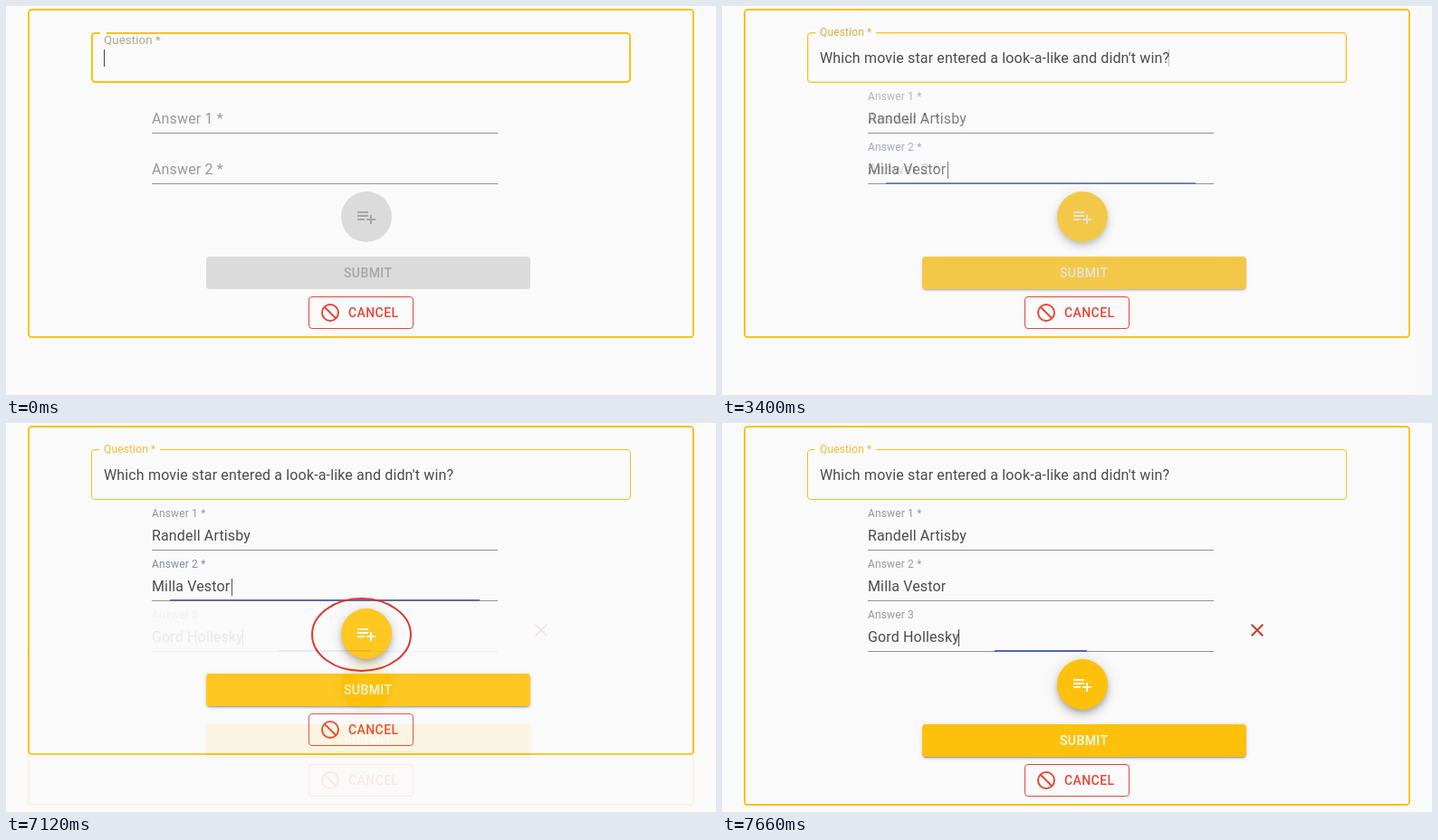
An HTML page that plays this animation: 784x430 px, repeating every 8000 ms.

```html
<!DOCTYPE html>
<html lang="en">
<head>
<meta charset="utf-8">
<title>Question form</title>
<style>
html, body { margin: 0; width: 100%; height: 100%; overflow: hidden; background: #fafafa; }
.scene { position: absolute; left: 0; top: 0; width: 784px; height: 430px; overflow: hidden; background: #fafafa; will-change: opacity; }
.scene svg { position: absolute; left: 0; top: 0; font: 16px Roboto, Arial, sans-serif; letter-spacing: .00938em; }
.button { font-size: 14px; font-weight: 500; letter-spacing: .02857em; }
.fab, .submit { position: absolute; background: #dbdbdb; }
.fab { left: 370px; width: 56px; height: 56px; border-radius: 50%; }
.submit { left: 221px; width: 358px; height: 36px; border-radius: 4px; }
.on { background: #fec10b; }
.fab.on { box-shadow: 0 3px 5px -1px rgba(0,0,0,.2), 0 6px 10px rgba(0,0,0,.14), 0 1px 18px rgba(0,0,0,.12); }
.submit.on { box-shadow: 0 3px 1px -2px rgba(0,0,0,.2), 0 2px 2px rgba(0,0,0,.14), 0 1px 5px rgba(0,0,0,.12); }
</style>
</head>
<body>
<script>
const LOOP = 8000, STEP = 60, STEPS = 10;
const INK = '#4c4c4c', GREY = '#999', YELLOW = '#f5c31c', RED = '#e5483a';
const ADD = 'M14 10H2v2h12v-2zm0-4H2v2h12V6zm4 8v-4h-2v4h-4v2h4v4h2v-4h4v-2h-4zM2 16h8v-2H2v2z';
const CLOSE = 'M19 6.41 17.59 5 12 10.59 6.41 5 5 6.41 10.59 12 5 17.59 6.41 19 12 13.41 17.59 19 19 17.59 13.41 12z';

const text = (s, x, y, color, size = 16) =>
  `<text x="${x}" y="${y}" fill="${color}" style="font-size:${size}px">${s}</text>`;
const buttonText = (s, x, y, color) =>
  `<text class="button" x="${x}" y="${y}" fill="${color}">${s}</text>`;
const bar = (x, y, w, h, color) =>
  `<rect x="${x}" y="${y}" width="${w}" height="${h}" fill="${color}"/>`;
const outline = (x, y, w, h, color, width) =>
  `<rect x="${x}" y="${y}" width="${w}" height="${h}" rx="3.5" fill="none" stroke="${color}" stroke-width="${width}"/>`;
const icon = (d, x, y, color) =>
  `<path d="${d}" transform="translate(${x} ${y})" fill="${color}"/>`;

function question({ value = '', focused, notch, label, caret }) {
  const box = focused ? outline(95, 30, 594, 54, YELLOW, 2) : outline(94.5, 29.5, 595, 55, YELLOW, 1);
  return box + bar(notch[0], 28, notch[1] - notch[0], 4, '#fafafa') +
    text('Question *', 108, label.y, label.color, label.size) +
    text(value, 108, 63, INK) + (caret ? bar(caret, 48, 1, 19, '#444') : '');
}

function answer({ label, value, color = GREY, caret, active }, i) {
  const y = 140 + 56 * i;
  let s = bar(161, y, 382, 1, '#929292');
  if (active) s += bar(active[0], y - 1, active[1] - active[0], 2, '#5960a8');
  s += value ? text(label, 161, y - 36, color, 12) + text(value, 161, y - 10, INK)
             : text(label, 161, y - 10, color);
  return s + (caret ? bar(caret, y - 24, 1, 19, '#444') : '');
}

function cancel(y) {
  return outline(334.5, y + .5, 115, 35, RED, 1) +
    `<g transform="translate(358 ${y + 18})" fill="none" stroke="${RED}" stroke-width="2">
      <circle r="9"/><path d="M-6.3-6.3 6.3 6.3"/></g>` +
    buttonText('CANCEL', 378, y + 23, RED);
}

function addScene({ field, answers, enabled, extra = '' }) {
  const shift = 56 * (answers.length - 2), on = enabled ? ' on' : '';
  const ink = enabled ? '#fffdf5' : '#a6a6a6';
  const div = document.createElement('div');
  div.className = 'scene';
  div.innerHTML = `<div class="fab${on}" style="top:${205 + shift}px"></div>
    <div class="submit${on}" style="top:${277 + shift}px"></div>
    <svg width="784" height="430">` +
    outline(25, 4, 734, 362 + shift, YELLOW, 2) +
    question(field) + answers.map(answer).join('') +
    icon(ADD, 386, 221 + shift, ink) +
    buttonText('SUBMIT', 373, 300 + shift, ink) +
    cancel(321 + shift) + extra + '</svg>';
  document.body.append(div);
  return div;
}

const value = "Which movie star entered a look-a-like and didn't win?";
const empty = { focused: true, notch: [104, 111], label: { y: 42, color: '#b3a48c', size: 13.2 }, caret: 108 };
const typed = { value, focused: true, notch: [104, 171], label: { y: 33, color: '#a39474', size: 12 }, caret: 493 };
const done = { value, notch: [103, 170], label: { y: 33, color: '#efbd38', size: 12 } };

const blank = color => [1, 2].map(n => ({ label: `Answer ${n} *`, color }));
const first = { label: 'Answer 1 *', value: 'Randell Artisby' };
const second = { label: 'Answer 2 *', value: 'Milla Vestor' };
const third = { label: 'Answer 3', value: 'Gord Hollesky', caret: 261, active: [301, 403] };
const two = [first, { ...second, color: '#8388ad', caret: 249, active: [181, 523] }];

const ring = '<ellipse cx="392.5" cy="234" rx="54.5" ry="40" fill="none" stroke="#d8231a" stroke-width="2"/>';

// Each scene fades in over the previous one, starting at its time in ms.
const scenes = [
  [-1000, { field: empty, answers: blank(GREY) }],
  [500, { field: typed, answers: blank('#888') }],
  [3040, { field: done, answers: two, enabled: true }],
  [4580, { field: done, answers: two, enabled: true, extra: ring }],
  [7120, { field: done, answers: [first, second, third], enabled: true, extra: icon(CLOSE, 579, 217, '#cf3a31') }]
].map(([start, spec]) => ({ start, el: addScene(spec) }));

const origin = performance.now();
function draw() {
  const t = (performance.now() - origin) % LOOP;
  for (const { start, el } of scenes) {
    const step = Math.floor((t - start) / STEP) + 1;
    el.style.opacity = Math.min(1, Math.max(0, step / STEPS));
  }
  requestAnimationFrame(draw);
}
draw();
</script>
</body>
</html>
```
